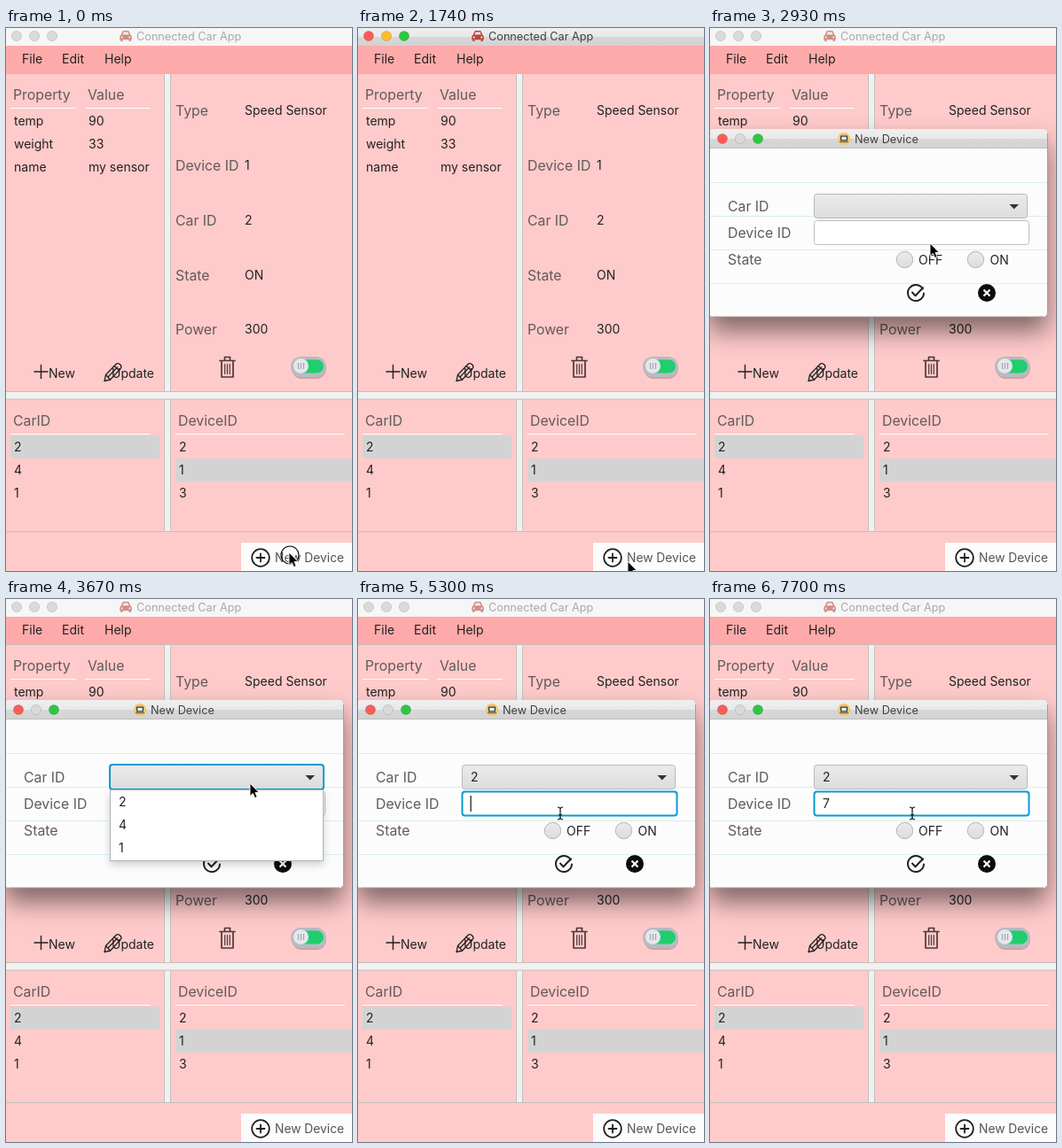
Write an HTML page that moves like this. It is 390 by 613 pixels and loops after 7.99 s.

```html
<!DOCTYPE html>
<html lang="en">
<head>
<meta charset="utf-8">
<title>Connected Car App</title>
<style>
  html, body { margin: 0; width: 100%; height: 100%; overflow: hidden; background: #ffcaca; }
  svg { display: block; width: 390px; height: 613px; font: 14px Inter, "Liberation Sans", sans-serif; fill: #222; }
  text { white-space: pre; }
  .label { font-size: 15.8px; fill: #625a5a; }
  .title { font-size: 12.7px; fill: #404040; }
  .line { fill: none; stroke: #222; stroke-linecap: round; stroke-linejoin: round; }
  .edge { fill: none; stroke: #c3bfbf; }
  .focus { fill: none; stroke: #0a9bd0; stroke-width: 2; }
  .shadow { filter: drop-shadow(0 16px 14px rgba(0, 0, 0, .5)); }
  .popup { filter: drop-shadow(0 4px 4px rgba(0, 0, 0, .18)); }
</style>
</head>
<body>
<svg viewBox="0 0 390 613">
  <defs>
    <linearGradient id="bar" x2="0" y2="1">
      <stop offset="0" stop-color="#efefef"/><stop offset=".52" stop-color="#e8e8e8"/>
      <stop offset=".52" stop-color="#d7d7d7"/><stop offset="1" stop-color="#d3d3d3"/>
    </linearGradient>
    <linearGradient id="btn" x2="0" y2="1">
      <stop offset="0" stop-color="#ebebeb"/><stop offset="1" stop-color="#dcdcdc"/>
    </linearGradient>
  </defs>

  <!-- main window -->
  <rect width="390" height="613" fill="#ffcaca"/>
  <rect width="390" height="20" fill="#f6f6f6"/>
  <rect id="activeBar" width="390" height="20" fill="url(#bar)"/>
  <g id="lights"></g>
  <g id="carIcon" fill="#b9473d">
    <path d="M129.5 8l1.8-4.2q.4-.8 1.2-.8h5q.8 0 1.2.8L140.500 8q1.300.6 1.300 2v3.200h-1v1.800h-2.300v-1.800h-7v1.800h-2.300v-1.800h-1V10q0-1.400 1.300-2z"/>
    <path d="M131.300 7.500l1.200-3h5l1.200 3z" fill="#f2dfdc"/>
    <circle cx="130.700" cy="10.500" r="1" fill="#fff"/><circle cx="139.300" cy="10.500" r="1" fill="#fff"/>
  </g>
  <text id="mainTitle" class="title" x="147" y="14">Connected Car App</text>

  <rect y="20" width="390" height="31" fill="#ffaaaa"/>
  <path class="edge" d="M0 51.500H390M0 568.500H390"/>
  <path d="M179 52h6v359h-6zM179 420h6v148h-6zM0 411h390v8H0z" fill="#f1f1f0"/>
  <path class="edge" d="M178.500 52V411M185.500 52V411M178.500 420V568M185.500 420V568M0 410.500H390M0 419H390"/>
  <path d="M5 90.500H79M89 90.500H163M5 458.500H163M191 458.500H382" stroke="#fff"/>
  <path d="M5 460h168v26H5zM191 486h199v26H191z" fill="#d3d3d3"/>
  <g id="mainText"></g>

  <path class="line" d="M39.500 380.500v15M32 388h15" stroke-width="1.400"/>
  <g class="line" stroke-width="1.300">
    <path d="M111 398.500l1.500-7 11.500-12q2-1.800 4.500.3t.7 4.700L117.500 397z"/>
    <path d="M112.500 391.500l5 5.500M122 381.500l5.500 5M115.500 393.500l10-10.500"/>
  </g>
  <g class="line" stroke="#4a3a3a" stroke-width="1.700" style="stroke:#4a3a3a">
    <path d="M241 375.500h17M246.500 375v-3.500h6v3.500M243 376v18h13v-18"/>
    <path d="M246.700 379.500v11M249.500 379.500v11M252.300 379.500v11" stroke-width="1.200"/>
  </g>
  <g>
    <rect x="322" y="373" width="39" height="23" rx="11.500" fill="#c9a3a6"/>
    <rect x="321" y="371" width="40" height="23" rx="11.500" fill="#b7bbc3"/>
    <rect x="325" y="374.500" width="33" height="15" rx="7.500" fill="#1fce6d"/>
    <circle cx="332.500" cy="381.500" r="8.500" fill="#e6e7ea"/>
    <path d="M329.500 378v7M332.500 378v7M335.500 378v7" stroke="#a3a7ae" stroke-width="1.200"/>
  </g>

  <rect x="265" y="581" width="125" height="32" fill="#fcfcfc"/>
  <circle class="line" cx="287" cy="598" r="9.800" stroke-width="1.800"/>
  <path class="line" d="M287 593.500v9M282.500 598h9" stroke-width="1.800"/>
  <text x="303" y="603" style="font-size:13.800px;fill:#555">New Device</text>

  <!-- dialog -->
  <g id="dialog">
    <rect class="shadow" x="-1" y="114" width="381" height="212" rx="5" fill="#ececec"/>
    <path d="M-1 136v-17q0-5 5-5H375q5 0 5 5v17z" fill="url(#bar)"/>
    <path d="M0 135.500H380" stroke="#bdbdbd"/>
    <g id="dialogLights"></g>
    <circle cx="151" cy="125" r="7" fill="#f3c565"/>
    <path d="M147 121.500h8v6h-8z" fill="#34383f"/>
    <path d="M148.200 122.700h5.600v3.600h-5.600z" fill="#dfe7ea"/>
    <path d="M146 128h10v1.200h-10z" fill="#7b6d61"/>
    <text class="title" x="163" y="130">New Device</text>

    <g id="form">
      <path d="M-1 136H380V321q0 5-5 5H4q-5 0-5-5z" fill="#fcfcfc"/>
      <path d="M0 174.500H380M0 212.500H380M0 250.500H380M0 288.500H380" stroke="#d9eef7"/>
      <text class="label" x="20" y="207">Car ID</text>
      <text class="label" x="20" y="237">Device ID</text>
      <text class="label" x="20" y="267">State</text>
      <rect x="117.500" y="187.500" width="240" height="27" rx="3" fill="url(#btn)" stroke="#b9b9b9"/>
      <path d="M337.500 199h10.500l-5.200 5.500z" fill="#333"/>
      <text id="carValue" x="127" y="206">2</text>
      <rect id="comboFocus" class="focus" x="117" y="187" width="241" height="28" rx="3"/>
      <rect x="117.500" y="217.500" width="242" height="27" rx="3" fill="#fff" stroke="#bcbcbc"/>
      <rect id="fieldFocus" class="focus" x="117.500" y="217.500" width="242" height="27" rx="3"/>
      <text id="idValue" x="127" y="236">7</text>
      <rect id="caret" y="222" width="1.300" height="18"/>
      <g fill="url(#btn)" stroke="#b5b5b5">
        <circle cx="219.500" cy="261.500" r="9.200"/><circle cx="299.500" cy="261.500" r="9.200"/>
      </g>
      <text x="235" y="267">OFF</text>
      <text x="315.500" y="267">ON</text>
      <path class="line" d="M239.800 294.500A9 9 0 1 0 241 299.500M228 298.500l3.500 3.700 8.500-9" stroke-width="2"/>
      <circle cx="312" cy="299" r="10" fill="#0c0c0c"/>
      <path d="M308.500 295.500l7 7M315.500 295.500l-7 7" stroke="#fff" stroke-width="2.200"/>
    </g>
    <path d="M380.500 119V322" stroke="#a99a9a"/>
    <path d="M3 326H376" stroke="#a99a9a"/>

    <g id="popup">
      <rect class="popup" x="117.500" y="215.500" width="240" height="80" fill="#fff" stroke="#adb5b8"/>
      <rect id="hover" x="118" y="216" width="239" height="26" fill="#0096c9"/>
      <text id="option" x="127" y="234">2</text>
      <text x="127" y="260">4</text>
      <text x="127" y="286">1</text>
    </g>
  </g>

  <!-- pointer -->
  <g id="pointer">
    <circle id="ring" cx="1" cy="3" r="10" fill="none" stroke="#111" stroke-width="1.200"/>
    <path id="arrow" d="M0 0V14.500l3.300-3 2.200 5 2.600-1.100-2.200-4.900h4.400z" fill="#000" stroke="#fff" stroke-width=".9"/>
    <path id="beam" d="M-3-7q3 0 3 2.500V4.500Q0 7-3 7M3-7q-3 0-3 2.500M3 7Q0 7 0 4.500M-1.800 1.500h3.600" fill="none" stroke="#111" stroke-width="1.200"/>
  </g>
</svg>
<script>
const LOOP = 7990;
const $ = id => document.getElementById(id);
const NS = 'http://www.w3.org/2000/svg';

function add(parent, tag, attrs, text) {
  const el = document.createElementNS(NS, tag);
  for (const key in attrs) el.setAttribute(key, attrs[key]);
  if (text) el.textContent = text;
  parent.append(el);
  return el;
}

const labels = [
  [8, 81, 'Property'], [92, 81, 'Value'], [191, 99, 'Type'], [191, 161, 'Device ID'],
  [191, 223, 'Car ID'], [191, 285, 'State'], [191, 346, 'Power'],
  [8, 449, 'CarID'], [194, 449, 'DeviceID']
];
const values = [
  [18, 40, 'File'], [63, 40, 'Edit'], [111, 40, 'Help'],
  [9, 110, 'temp'], [93, 110, '90'], [9, 136, 'weight'], [93, 136, '33'],
  [9, 162, 'name'], [93, 162, 'my sensor'],
  [269, 98, 'Speed Sensor'], [269, 160, '1'], [269, 222, '2'], [269, 284, 'ON'], [269, 345, '300'],
  [48, 395, 'New'], [119, 395, 'Update'],
  [9, 478, '2'], [9, 504, '4'], [9, 530, '1'],
  [195, 478, '2'], [195, 504, '1'], [195, 530, '3']
];
for (const [x, y, s] of labels) add($('mainText'), 'text', { x, y, class: 'label' }, s);
for (const [x, y, s] of values) add($('mainText'), 'text', { x, y }, s);

const RED = '#fc5b57', YELLOW = '#fdbc2e', GREEN = '#2bc840', GRAY = '#dadada';
const light = (parent, cx, cy, fill) =>
  add(parent, 'circle', { cx, cy, r: 5.6, fill, stroke: '#00000020' });
const mainColors = [RED, YELLOW, GREEN];
const mainLights = mainColors.map((c, i) => light($('lights'), 12 + 20 * i, 9, c));
[RED, GRAY, GREEN].forEach((c, i) => light($('dialogLights'), 14 + 20 * i, 125, c));

// pointer steps: time, x, y
const path = [
  [0, 319, 592], [150, 291, 579], [300, 252, 570], [440, 231, 568], [590, 268, 588], [730, 304, 602],
  [2630, 297, 560], [2780, 268, 370], [2930, 248, 243], [3070, 252, 232], [3220, 264, 217],
  [3370, 275, 208], [3970, 264, 214], [4120, 248, 222], [4270, 238, 228],
  [4410, 234, 230], [5010, 230, 236], [5160, 228, 242]
];

// spans in which each part is visible
const spans = {
  ring: [[0, 150], [1480, 1740]],
  activeBar: [[1600, 1880]],
  dialog: [[1880, LOOP]],
  form: [[2030, LOOP]],
  comboFocus: [[3520, 5160]],
  popup: [[3670, 4560]],
  hover: [[4120, 4560]],
  carValue: [[4560, LOOP]],
  fieldFocus: [[5160, LOOP]],
  caret: [[5300, 5900], [6350, 6800], [7250, 7700]],
  idValue: [[7250, LOOP]],
  arrow: [[0, 5160]],
  beam: [[5160, LOOP]]
};
const within = (t, list) => list.some(([a, b]) => t >= a && t < b);

function draw(t) {
  for (const id in spans) $(id).style.display = within(t, spans[id]) ? '' : 'none';

  const active = within(t, spans.activeBar);
  mainLights.forEach((el, i) => el.setAttribute('fill', active ? mainColors[i] : GRAY));
  $('mainTitle').style.fill = active ? '#404040' : '#a9a9a9';
  $('carIcon').style.opacity = active ? 1 : .6;
  $('option').style.fill = within(t, spans.hover) ? '#fff' : '';
  $('caret').setAttribute('x', t < 7250 ? 126.5 : 134.7);

  const [, x, y] = path.findLast(p => p[0] <= t);
  $('pointer').setAttribute('transform', `translate(${x} ${y})`);
}

const start = performance.now();
function tick() {
  draw((performance.now() - start) % LOOP);
  requestAnimationFrame(tick);
}
tick();
</script>
</body>
</html>
```
